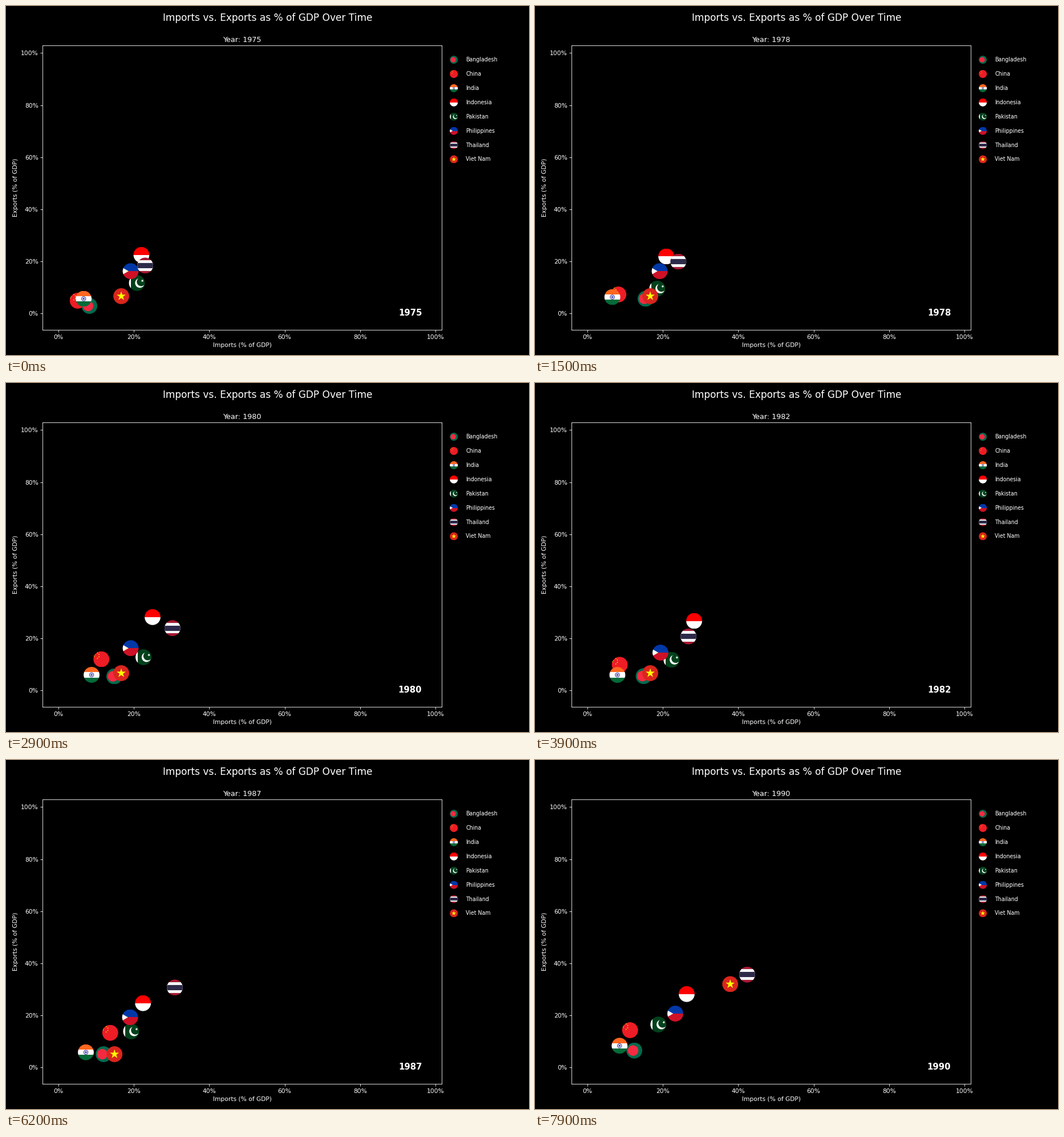
Animation of 917x611 px, one loop 8 s. Source, as a matplotlib script:

```python
import numpy as np
import matplotlib.pyplot as plt
from matplotlib.animation import FuncAnimation
from matplotlib.patches import Annulus, Circle, Polygon, Rectangle
from matplotlib.path import Path
from matplotlib.ticker import PercentFormatter
from matplotlib.transforms import Affine2D

W, H, DPI = 917, 611, 64
K = 76.4 / DPI                      # point sizes are meant for 76.4 dpi
LEFT, RIGHT, TOP, BOTTOM = 64.2, 764.2, 69.2, 567.2
X0, Y0, DX, DY = 92.0, 538.3, 6.61, 4.56    # pixel of 0 %, pixels per percent
START, STEPS, FRAMES = 1975, 5, 80
R_FLAG, R_KEY = 13.9, 7.0

plt.style.use("dark_background")
sizes = {"font.size": 10, "axes.linewidth": 0.8, "axes.titlepad": 6,
         "axes.labelpad": 4}
for side in ("xtick", "ytick"):
    sizes.update({f"{side}.major.size": 3.5, f"{side}.major.pad": 3.5,
                  f"{side}.major.width": 0.8})
plt.rcParams.update({key: value * K for key, value in sizes.items()})
plt.rcParams["font.family"] = "DejaVu Sans"

fig = plt.figure(figsize=(W / DPI, H / DPI), dpi=DPI, facecolor="black")
ax = fig.add_axes([LEFT / W, 1 - BOTTOM / H,
                   (RIGHT - LEFT) / W, (BOTTOM - TOP) / H])
ax.set_xlim((LEFT - X0) / DX, (RIGHT - X0) / DX)
ax.set_ylim((Y0 - BOTTOM) / DY, (Y0 - TOP) / DY)
for axis in (ax.xaxis, ax.yaxis):
    axis.set_ticks(range(0, 101, 20))
    axis.set_major_formatter(PercentFormatter(decimals=0))
ax.set_xlabel("Imports (% of GDP)")
ax.set_ylabel("Exports (% of GDP)")
fig.suptitle("Imports vs. Exports as % of GDP Over Time", fontsize=16 * K)
title = ax.set_title("")
stamp = ax.text(0.95, 0.05, "", transform=ax.transAxes, ha="right",
                fontsize=14 * K, fontweight="bold")


# Flag parts, in units where the flag's half height is 1.
def shape(points, color):
    return Polygon(points, closed=True, fc=color, lw=0)


def band(y0, y1, color, x0=-1.2, x1=1.2):
    return Rectangle((x0, y0), x1 - x0, y1 - y0, fc=color, lw=0)


def disc(x, y, r, color):
    return Circle((x, y), r, fc=color, lw=0)


def star(x, y, r, color, turn=0.0):
    a = np.pi / 2 + turn + np.arange(10) * np.pi / 5
    rad = np.where(np.arange(10) % 2, 0.382 * r, r)
    return shape(np.column_stack([x + rad * np.cos(a), y + rad * np.sin(a)]),
                 color)


def bangladesh():
    return [band(-1, 1, "#006a4e"), disc(-1 / 6, 0, 2 / 3, "#f42a41")]


def china():
    small = [(-0.5, 0.8), (-0.3, 0.6), (-0.3, 0.3), (-0.5, 0.1)]
    return ([band(-1, 1, "#ee1c25"), star(-1, 0.5, 0.3, "#ffff00")]
            + [star(x, y, 0.1, "#ffff00", 0.4) for x, y in small])


def india():
    ring = Annulus((0, 0), 0.3, 0.06, fc="#3a389f", lw=0)
    return [band(-1 / 3, 1 / 3, "#ffffff"), band(1 / 3, 1, "#ff671f"),
            band(-1, -1 / 3, "#046a38"), disc(0, 0, 0.3, "#c9c8e6"), ring,
            disc(0, 0, 0.1, "#3a389f")]


def indonesia():
    return [band(0, 1, "#ff0000"), band(-1, 0, "#ffffff")]


def pakistan():
    green = "#01411c"
    return [band(-1, 1, green, -0.75), band(-1, 1, "#ffffff", -1.2, -0.75),
            disc(0.375, 0, 0.6, "#ffffff"), disc(0.54, 0.15, 0.55, green),
            star(0.69, 0.28, 0.2, "#ffffff", -0.85)]


def philippines():
    tip = 3 ** 0.5 - 2
    return [band(0, 1, "#0038a8"), band(-1, 0, "#ce1126"),
            shape([(-2, 1), (-2, -1), (tip, 0)], "#ffffff"),
            star(tip - 0.25, 0, 0.09, "#fcd116", -np.pi / 2)]


def thailand():
    return [band(-1, 1, "#a51931"), band(-2 / 3, 2 / 3, "#f4f5f8"),
            band(-1 / 3, 1 / 3, "#2d2a4a")]


def viet_nam():
    return [band(-1, 1, "#da251d"), star(0, 0, 0.6, "#ffff00")]


def put(place, x, y, r):
    """Move a badge to pixel (x, y), counted from the bottom left."""
    place.clear().scale(r / DPI).translate(x / DPI, y / DPI)


def badge(parts, level):
    place = Affine2D()
    trans = place + fig.dpi_scale_trans
    for part in parts:
        part.set_transform(trans)
        part.set_clip_path(Path.unit_circle(), trans)
        part.set_zorder(level)
        fig.add_artist(part)
    return place


countries = []


def add(name, flag, imports, exports):
    n = len(countries)
    height = 0.95 - 0.05 * n
    key = badge(flag(), 1)
    put(key, LEFT + 1.03 * (RIGHT - LEFT),
        H - BOTTOM + height * (BOTTOM - TOP), R_KEY)
    ax.text(1.06, height, name, transform=ax.transAxes, va="center",
            fontsize=9 * K)
    # Yearly values end in 1991; earlier gaps hold the first value.
    years = np.arange(1992 - len(imports), 1992)
    countries.append((badge(flag(), 2 + n), years, imports, exports))


add("Bangladesh", bangladesh,
    [8.2, 15.0, 12.6, 15.4, 15.6, 16.0, 14.5, 15.9, 14.65, 13.4, 12.9, 11.9,
     11.8, 12.2, 13.0, 13.5, 12.15],
    [2.9, 4.7, 6.2, 5.65, 6.1, 5.5, 5.4, 5.1, 5.6, 5.0, 5.45, 5.1,
     5.0, 5.25, 5.5, 5.9, 6.65])
add("China", china,
    [5.1, 4.75, 4.55, 8.2, 9.6, 10.9, 11.5, 9.6, 8.3, 9.4, 12.5, 12.8,
     13.4, 14.2, 12.9, 10.7, 11.45],
    [4.9, 4.7, 4.6, 7.3, 8.6, 10.6, 12.35, 11.3, 9.5, 9.2, 8.4, 10.4,
     13.2, 13.45, 12.2, 13.6, 14.5])
add("India", india,
    [6.68, 6.2, 6.4, 6.6, 8.2, 9.3, 8.65, 8.15, 7.88, 7.75, 7.72, 6.95,
     7.05, 7.58, 8.3, 8.55, 8.5],
    [5.66, 6.8, 6.5, 6.3, 6.8, 6.2, 5.95, 6.05, 5.95, 6.3, 5.3, 5.2,
     5.65, 6.1, 7.05, 7.1, 8.65])
add("Indonesia", indonesia,
    [22.0, 21.8, 20.2, 20.9, 23.5, 20.8, 26.0, 25.5, 29.0, 24.0, 21.0, 20.5,
     22.3, 22.6, 23.5, 24.8, 26.7],
    [22.5, 22.2, 23.0, 21.9, 29.0, 30.5, 27.6, 23.9, 27.4, 26.3, 23.9, 19.8,
     24.5, 25.0, 26.0, 26.6, 28.6])
add("Pakistan", pakistan,
    [20.8, 18.2, 18.4, 18.5, 21.6, 24.1, 22.15, 21.6, 22.45, 22.2, 22.7, 20.4,
     18.9, 19.8, 20.8, 23.0, 17.75],
    [11.7, 10.7, 9.3, 9.55, 10.9, 12.5, 12.85, 10.0, 12.25, 11.2, 10.7, 11.9,
     13.7, 14.1, 13.9, 15.5, 16.75])
add("Philippines", philippines,
    [19.15, 18.6, 19.55, 17.9, 15.8, 15.9, 18.8, 19.3, 21.4, 23.5, 23.25],
    [16.25, 14.3, 14.6, 17.1, 17.1, 18.6, 18.9, 19.8, 19.8, 19.4, 21.0])
add("Thailand", thailand,
    [23.0, 22.8, 25.8, 24.1, 28.5, 30.4, 30.2, 24.7, 27.3, 26.2, 26.0, 23.6,
     28.5, 34.4, 37.5, 41.6, 42.55],
    [18.4, 20.2, 20.0, 19.9, 22.6, 24.1, 23.9, 22.9, 20.2, 21.9, 23.25, 25.6,
     29.1, 33.1, 34.9, 34.1, 36.05])
add("Viet Nam", viet_nam,
    [16.65, 15.5, 13.9, 33.6, 45.3, 36.0],
    [6.65, 5.85, 4.0, 23.9, 36.0, 31.0])


def draw(i):
    year = START + i / STEPS
    for place, years, imports, exports in countries:
        x = X0 + DX * np.interp(year, years, imports)
        y = Y0 - DY * np.interp(year, years, exports)
        put(place, x, H - y, R_FLAG)
    title.set_text(f"Year: {START + i // STEPS}")
    stamp.set_text(f"{START + i // STEPS}")


anim = FuncAnimation(fig, draw, frames=FRAMES, interval=100, repeat=True,
                     repeat_delay=0, blit=False)
plt.show()
```
